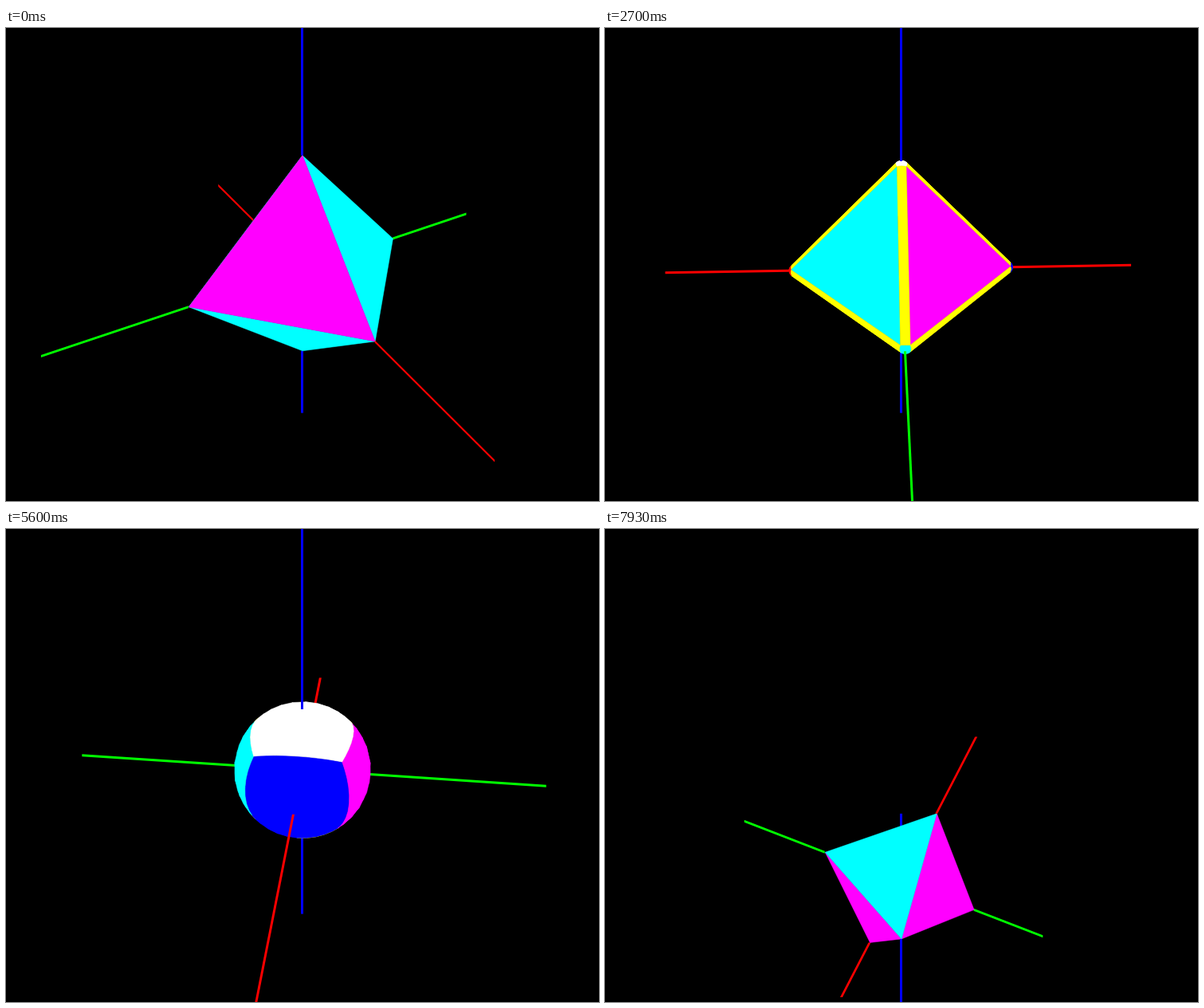
An HTML page with a canvas for the animation above (8000 ms loop, 744 px wide and 593 px high).

```html
<!DOCTYPE html>
<html lang="en">
<head>
<meta charset="utf-8">
<title>Octahedron to sphere</title>
<style>
  html, body { margin: 0; width: 100%; height: 100%; overflow: hidden; background: #000; }
  canvas { display: block; }
</style>
</head>
<body>
<canvas id="stage" width="744" height="593"></canvas>
<script>
const ctx = document.getElementById('stage').getContext('2d');
const LOOP = 8000, CENTER_X = 372, CENTER_Y = 302, FOCAL = 525;
const EYE_DISTANCE = 1.4665, EYE_HEIGHT = 1.037, VERTEX = 0.5, GRID = 10;
const RED = '#f00', GREEN = '#0f0', BLUE = '#00f', CYAN = '#0ff',
      MAGENTA = '#f0f', YELLOW = '#ff0', WHITE = '#fff';

const dot = (a, b) => a[0] * b[0] + a[1] * b[1] + a[2] * b[2];
const mix = (a, s, b, t) => a.map((value, i) => value * s + b[i] * t);
const unit = v => v.map(value => value / Math.hypot(...v));
const average = list => list.reduce((sum, v) => mix(sum, 1, v, 1 / list.length), [0, 0, 0]);

// Half-axes: direction, line colour and colour of the rounded corner.
const halfAxes = [
  { dir: [1, 0, 0], line: RED, cap: RED },
  { dir: [-1, 0, 0], line: RED, cap: BLUE },
  { dir: [0, 1, 0], line: GREEN, cap: CYAN },
  { dir: [0, -1, 0], line: GREEN, cap: MAGENTA },
  { dir: [0, 0, 1], line: BLUE, cap: WHITE },
  { dir: [0, 0, -1], line: BLUE, cap: WHITE }
];

// Each corner is an anchor on the shrinking core plus an outward normal.
const faces = [], rounding = [];
function addPatch(list, color, corners) {
  list.push({ color, corners, normal: unit(average(corners.map(c => c.normal))) });
}

for (const x of [-1, 1]) for (const y of [-1, 1]) for (const z of [-1, 1]) {
  const normal = unit([x, y, z]);
  addPatch(faces, x * y * z > 0 ? CYAN : MAGENTA,
    [[x, 0, 0], [0, y, 0], [0, 0, z]].map(anchor => ({ anchor, normal })));
}

const gridLine = i => 2 * i / GRID - 1;
const basis = [[1, 0, 0], [0, 1, 0], [0, 0, 1]];

for (let axis = 0; axis < 3; axis++) {
  const w = basis[axis];
  for (const s of [-1, 1]) for (const t of [-1, 1]) {
    const u = basis[(axis + 1) % 3].map(v => v * s);
    const v = basis[(axis + 2) % 3].map(v => v * t);
    const arc = i => unit(mix(mix(u, 1, v, 1), 1, w, gridLine(i)));
    for (let i = 0; i < GRID; i++) {
      addPatch(rounding, YELLOW, [[u, i], [v, i], [v, i + 1], [u, i + 1]]
        .map(([anchor, k]) => ({ anchor, normal: arc(k) })));
    }
  }
}

for (const { dir, cap } of halfAxes) {
  const [v, w] = basis.filter(b => dot(b, dir) === 0);
  const bulge = (i, j) => unit(mix(mix(dir, 1, v, gridLine(i)), 1, w, gridLine(j)));
  for (let i = 0; i < GRID; i++) for (let j = 0; j < GRID; j++) {
    addPatch(rounding, cap, [[i, j], [i + 1, j], [i + 1, j + 1], [i, j + 1]]
      .map(([a, b]) => ({ anchor: dir, normal: bulge(a, b) })));
  }
}

// Steady turn of about 90 degrees per second.
const turn = [[0, 30], [1470, 162], [2700, 271.5], [3600, 355.5],
              [4930, 472.5], [6300, 597], [7930, 744], [8000, 750.3]];
function angleAt(t) {
  const i = turn.findIndex(key => key[0] > t);
  const [t0, a0] = turn[i - 1], [t1, a1] = turn[i];
  return (a0 + (a1 - a0) * (t - t0) / (t1 - t0)) * Math.PI / 180;
}

// A held key: one step at once, then a pause and a quick repeat.
function heldSteps(t, start) {
  if (t < start) return 0;
  return Math.min(10, 1 + Math.max(0, Math.floor((t - start - 250) / 33) + 1));
}
const roundnessAt = t =>
  (heldSteps(t, 2550) - heldSteps(t, 3570) + heldSteps(t, 4690) - heldSteps(t, 5690)) / 10;

function cameraAt(t) {
  const angle = angleAt(t), cos = Math.cos(angle), sin = Math.sin(angle);
  const height = EYE_HEIGHT - 0.0029 * Math.max(0, t - 6810);
  const elevation = Math.atan2(-height, EYE_DISTANCE);
  const start = Math.atan2(-EYE_HEIGHT, EYE_DISTANCE);
  const pitch = elevation + 0.163 * (elevation - start);
  const pc = Math.cos(pitch), ps = Math.sin(pitch);
  return {
    eye: [EYE_DISTANCE * cos, -EYE_DISTANCE * sin, height],
    project([x, y, z]) {
      const ahead = EYE_DISTANCE - (x * cos - y * sin), above = z - height;
      const scale = FOCAL / (ahead * pc + above * ps);
      return [CENTER_X + (x * sin + y * cos) * scale,
              CENTER_Y - (above * pc - ahead * ps) * scale];
    }
  };
}

// Lines are three pixels thick along the minor screen axis.
function drawLine(camera, from, to, color) {
  const [x0, y0] = camera.project(from), [x1, y1] = camera.project(to);
  const flat = Math.abs(x1 - x0) > Math.abs(y1 - y0);
  const ox = flat ? 0 : 1.5, oy = flat ? 1.5 : 0;
  ctx.fillStyle = color;
  ctx.beginPath();
  ctx.moveTo(x0 - 0.5 - ox, y0 - oy);
  ctx.lineTo(x1 - 0.5 - ox, y1 - oy);
  ctx.lineTo(x1 - 0.5 + ox, y1 + oy);
  ctx.lineTo(x0 - 0.5 + ox, y0 + oy);
  ctx.fill();
}

function drawBody(camera, core, radius) {
  const paths = new Map();
  const visible = [...(core > 0 ? faces : []), ...(radius > 0 ? rounding : [])];
  for (const { color, corners, normal } of visible) {
    const points = corners.map(c => mix(c.anchor, core, c.normal, radius));
    if (dot(normal, mix(camera.eye, 1, average(points), -1)) <= 0) continue;
    if (!paths.has(color)) paths.set(color, new Path2D());
    const path = paths.get(color);
    points.forEach((p, i) => path[i ? 'lineTo' : 'moveTo'](...camera.project(p)));
    path.closePath();
  }
  ctx.lineWidth = 0.5;
  ctx.lineJoin = 'round';
  for (const [color, path] of paths) {
    ctx.fillStyle = ctx.strokeStyle = color;
    ctx.fill(path);
    ctx.stroke(path);
  }
}

function draw(t) {
  const camera = cameraAt(t), roundness = roundnessAt(t);
  const core = VERTEX * (1 - roundness), radius = VERTEX / Math.sqrt(3) * roundness;
  const tip = core + radius;
  const inFront = axis => dot(camera.eye, axis.dir) > tip;
  const drawAxis = ({ dir, line }) => drawLine(camera, dir.map(v => v * tip), dir, line);

  ctx.fillStyle = '#000';
  ctx.fillRect(0, 0, 744, 593);
  halfAxes.filter(axis => !inFront(axis)).forEach(drawAxis);
  drawBody(camera, core, radius);
  halfAxes.filter(inFront).forEach(drawAxis);
}

const began = performance.now();
function tick() {
  draw((performance.now() - began) % LOOP);
  requestAnimationFrame(tick);
}
tick();
</script>
</body>
</html>
```
